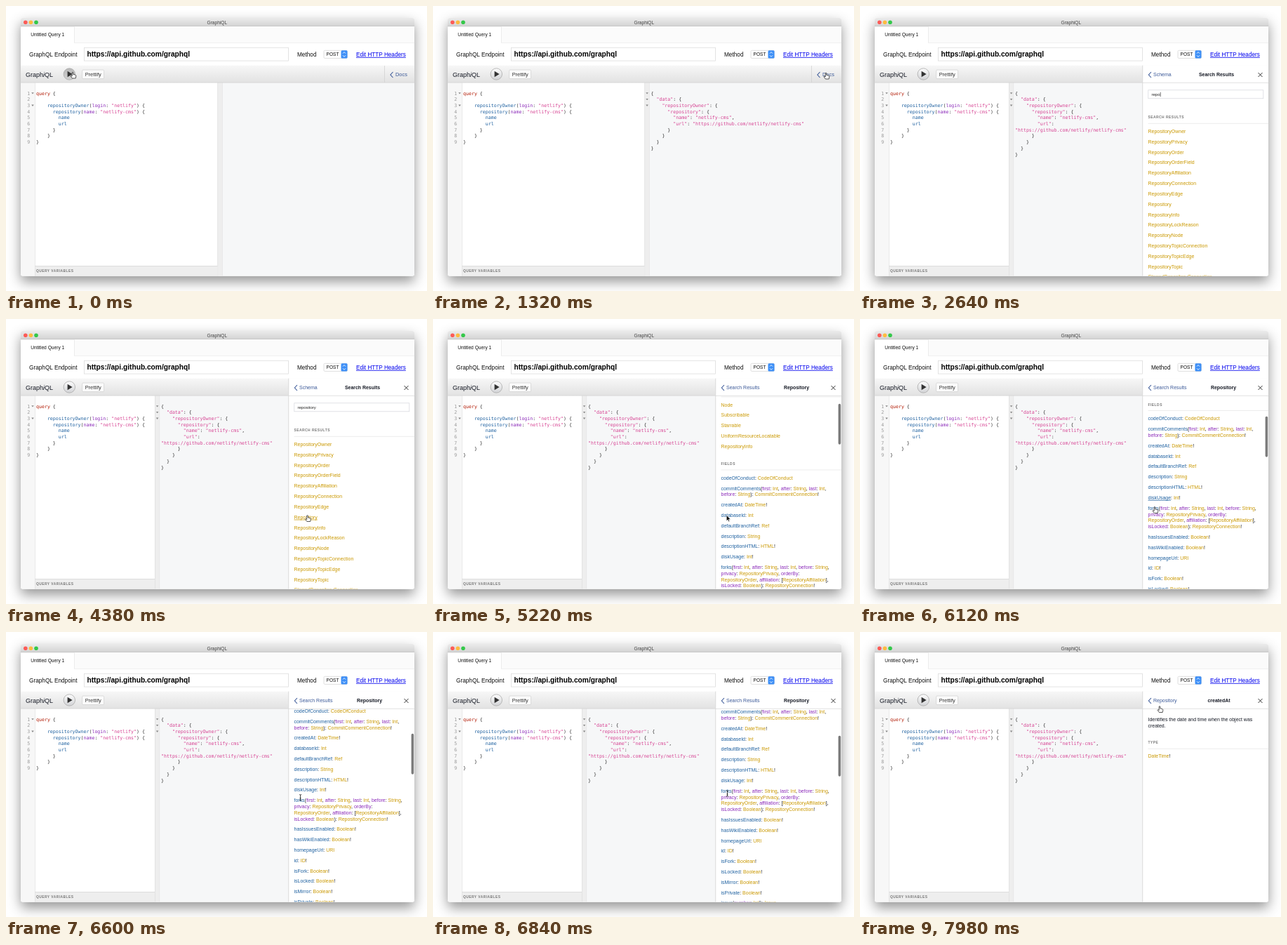
An HTML page that plays this animation: 600 px wide and 406 px high, repeating every 8000 ms.

```html
<!DOCTYPE html>
<html lang="en">
<head>
<meta charset="utf-8">
<title>GraphiQL schema browsing</title>
<style>
  html, body { margin: 0; width: 100%; height: 100%; overflow: hidden; background: #fff; }
  svg { display: block; width: 100vw; height: 100vh; }
  text { font-family: "Liberation Sans", Arial, sans-serif; white-space: pre; }
  .code { font-family: "DejaVu Sans Mono", "Liberation Mono", monospace; }
  .bold { font-weight: bold; }
  .caps { font-weight: bold; letter-spacing: .5px; }
  .shadow { filter: drop-shadow(0 8px 9px rgba(0, 0, 0, .42)); }
</style>
</head>
<body>
<svg id="stage" viewBox="0 0 600 406"></svg>
<script>
const LOOP = 8000;
const INK = '#141823', NAVY = '#3b5998', BLUE = '#1f61a0', GOLD = '#ca9800',
  PURPLE = '#8b2bb9', PINK = '#d64292', RED = '#b11a04';
const ROW = 14.81, WRAP = 8.8, CODE_ROW = 8.7, DOC_X = 410.5;

// Markup helpers; text is placed by the vertical centre of its capitals.
const rect = (x, y, w, h, fill, extra = '') =>
  `<rect x="${x}" y="${y}" width="${w}" height="${h}" fill="${fill}" ${extra}/>`;
const path = (d, stroke, width = 1, fill = 'none') =>
  `<path d="${d}" fill="${fill}" stroke="${stroke}" stroke-width="${width}"/>`;
const text = (x, y, str, size = 6.97, fill = INK, extra = '') =>
  `<text x="${x}" y="${y + size * .35}" font-size="${size}" fill="${fill}" ${extra}>${str}</text>`;
const group = (id, body, extra = '') => `<g id="${id}" ${extra}>${body}</g>`;
const span = (fill, word) => `<tspan class="link-${word.replace(/\W/g, '')}" fill="${fill}">${word}</tspan>`;
const middle = 'text-anchor="middle"';

const paintCode = line => line.replace(/"[^"]*"|\w+/g, (word, i) => span(
  word[0] === '"' ? PINK : word === 'query' ? RED : line[i + word.length] === ':' ? PURPLE : BLUE, word));
const paintDoc = (line, isField) => line.replace(/\w+/g, (word, i) => span(
  isField && i === 0 ? BLUE : line[i + word.length] === ':' ? PURPLE : GOLD, word));

const codeBlock = (x, lines) => lines.map((line, i) =>
  text(x, 124.2 + i * CODE_ROW, paintCode(line), 6.6, '#333', 'class="code"')).join('');

const fold = (x, line) => {
  const y = 123.2 + line * CODE_ROW;
  return path(`M${x - 1.8} ${y}h3.6l-1.8 2.4z`, 'none', 0, '#888');
};

function docRows(y, rows, isField) {
  let out = '';
  for (const row of rows) {
    row.split('\n').forEach((line, i) => {
      out += text(DOC_X, y + i * WRAP, paintDoc(line, isField && i === 0));
    });
    y += ROW + (row.split('\n').length - 1) * WRAP;
  }
  return out;
}

const section = (y, name) => text(DOC_X, y, name, 4.9, '#777', 'class="caps"') +
  rect(DOC_X, y + 8.4, 172, .6, '#e0e0e0');

const chevron = x => path(`M${x + 4} 94l-3.6 4 3.6 4`, NAVY, 1.1);

const header = (title, x, back) =>
  (back ? chevron(411) + text(418, 98, back, 7, NAVY) : '') +
  text(x, 98, title, 6.95, INK, `class="bold" ${middle}`) +
  path('M567.5 95l6 6m0-6l-6 6', '#333', 1);

const searchBox = rect(410.8, 119.8, 164, 12, '#fff', 'stroke="#d3d6db" stroke-width=".7"');

const queryLines = ['query {', '', '    repositoryOwner(login: "netlify") {',
  '      repository(name: "netlify-cms") {', '        name', '        url', '      }', '    }', '}'];

function resultLines(wrapped) {
  const url = '"https://github.com/netlify/netlify-cms"';
  return ['{', '  "data": {', '    "repositoryOwner": {', '      "repository": {',
    '        "name": "netlify-cms",',
    ...(wrapped ? ['        "url":', url] : ['        "url": ' + url]),
    '      }', '    }', '  }', '}'];
}

// Editor and result panes; `split` is where the result's gutter begins.
const panes = (id, split, wrapped) => group(id,
  rect(split, 109, 600, 276, '#f6f7f8') +
  rect(split, 109, 7, 276, '#eee') + rect(split, 109, .6, 276, '#ddd') + rect(split + 6.6, 109, .5, 276, '#e0e0e0') +
  group(id + '-result', codeBlock(split + 9, resultLines(wrapped)) +
    [0, 1, 2].map(i => fold(split + 3.6, i)).join('')) +
  rect(21, 370, split - 21, 15, '#eee') + rect(21, 370, split - 21, .7, '#d6d6d6') +
  text(43, 377.5, 'QUERY VARIABLES', 4.85, '#777', 'class="caps"'));

const chrome =
  rect(21, 17, 561, 12, 'url(#bar)') + rect(21, 28.6, 561, .6, '#b5b5b5') +
  ['#fc5b57', '#fdbc40', '#34c84a'].map((c, i) =>
    `<circle cx="${27.8 + i * 7.6}" cy="23.3" r="2.8" fill="${c}"/>`).join('') +
  text(300.8, 23.4, 'GraphiQL', 6.6, '#444', middle) +
  rect(97, 29.2, 485, 23, '#fbfbfb') + rect(97, 29.2, .6, 23, '#e3e3e3') + rect(97, 52, 485, .6, '#e8e8e8') +
  text(35.3, 41, 'Untitled Query 1', 6.65, '#111') +
  text(33, 69, 'GraphQL Endpoint', 8.25, '#111') +
  rect(111.4, 59.3, 291, 18.8, '#fff', 'stroke="#ddd" stroke-width=".8"') +
  text(115.5, 68.7, 'https://api.github.com/graphql', 10.2, '#000', 'class="bold"') +
  text(415, 69, 'Method', 8.25, '#111') +
  rect(453, 63.3, 33.5, 11.2, '#fff', 'rx="1.5" stroke="#ccc" stroke-width=".6"') +
  rect(477.5, 63.3, 9, 11.2, '#3d8ff7', 'rx="1.5"') +
  path('M480 67.6l2-2 2 2m-4 2.7l2 2 2-2', '#fff', .9) +
  text(456.5, 69, 'POST', 6.6, '#111') +
  text(499, 69, 'Edit HTTP Headers', 8.2, '#00e', 'text-decoration="underline"') +
  rect(21, 84.7, 561, 24.5, 'url(#tools)') + rect(21, 108.7, 561, .7, '#d0d0d0') +
  text(28, 97.5, 'Graph<tspan font-style="italic">i</tspan>QL', 9, INK) +
  '<circle id="play" cx="90.3" cy="97" r="8.2" stroke="#a9a9a9" stroke-width=".8"/>' +
  path('M87.6 92.8v8.4l7-4.2z', 'none', 0, '#333') +
  rect(108.6, 91, 31, 12.6, '#fbfbfb', 'rx="1.5" stroke="#cfcfcf" stroke-width=".7"') +
  text(124.2, 97.2, 'Prettify', 7.4, '#333', middle) +
  rect(539, 85, .7, 24, '#cfcfcf') + chevron(547.5) + text(555, 97.7, 'Docs', 7.4, NAVY);

const gutter = rect(21, 109.3, 20, 276, '#f7f7f7') + rect(41, 109.3, .6, 276, '#ddd') +
  queryLines.map((_, i) => text(34.3, 124.2 + i * CODE_ROW, i + 1, 6.6, '#999', 'class="code" text-anchor="end"')).join('') +
  fold(38, 0) + fold(38, 2) + codeBlock(43, queryLines);

const rootPage = header('Documentation Explorer', 492) + searchBox +
  text(415.5, 126, 'Search Schema...', 6, '#aaa') +
  text(DOC_X, 145, 'A GraphQL schema provides a root type for each') +
  text(DOC_X, 145 + WRAP, 'kind of operation.') +
  section(178, 'ROOT TYPES') + docRows(198, ['query: Query', 'mutation: Mutation'], true);

const suffixes = ['Owner', 'Privacy', 'Order', 'OrderField', 'Affiliation', 'Connection', 'Edge', '',
  'Info', 'LockReason', 'Node', 'TopicConnection', 'TopicEdge', 'Topic'];
const searchPage = header('Search Results', 508, 'Schema') + searchBox +
  text(415.5, 126, '', 6, '#222', 'id="typed"') + rect(0, 122.8, .6, 6.4, '#111', 'id="caret"') +
  section(158.5, 'SEARCH RESULTS') +
  docRows(178.6, [...suffixes.map(s => 'Repository' + s), 'StarredRepositoryConnection']);

const fields = ['codeOfConduct: CodeOfConduct',
  'commitComments(first: Int, after: String, last: Int,\nbefore: String): CommitCommentConnection!',
  'createdAt: DateTime!', 'databaseId: Int', 'defaultBranchRef: Ref', 'description: String',
  'descriptionHTML: HTML!', 'diskUsage: Int!',
  'forks(first: Int, after: String, last: Int, before: String,\nprivacy: RepositoryPrivacy, orderBy:\n' +
  'RepositoryOrder, affiliation: [RepositoryAffiliation],\nisLocked: Boolean): RepositoryConnection!',
  'hasIssuesEnabled: Boolean!', 'hasWikiEnabled: Boolean!', 'homepageUrl: URI', 'id: ID!', 'isFork: Boolean!',
  'isLocked: Boolean!', 'isMirror: Boolean!', 'isPrivate: Boolean!', 'issue(number: Int!): Issue'];
const typePage = header('Repository', 518, 'Search Results') +
  '<g clip-path="url(#docClip)">' + group('scroller',
    text(DOC_X, 124.5, 'A repository contains the content for a project.') +
    section(149, 'IMPLEMENTS') +
    docRows(168.8, ['Node', 'Subscribable', 'Starrable', 'UniformResourceLocatable', 'RepositoryInfo']) +
    section(253, 'FIELDS') + docRows(273, fields, true)) + '</g>' +
  rect(577.6, 111, 3.6, 58, '#7c7c7c', 'id="thumb" rx="1.8"');

const fieldPage = header('createdAt', 511.5, 'Repository') +
  text(DOC_X, 124.5, 'Identifies the date and time when the object was') +
  text(DOC_X, 124.5 + WRAP, 'created.') + section(157.5, 'TYPE') + docRows(176.8, ['DateTime!']);

const pages = { root: rootPage, search: searchPage, type: typePage, field: fieldPage };
const docs = group('docs',
  rect(402.4, 84.7, 180, 301, '#fff') + rect(402.4, 84.7, .8, 301, '#cfcfcf') + rect(402.4, 108.9, 180, .7, '#d6d6d6') +
  Object.entries(pages).map(([name, body]) => group('page-' + name, body)).join(''));

const cursors = group('cursor',
  group('cursor-arrow', path('M0 0V8.2L1.9 6.5 3.1 9.2 4.4 8.6 3.2 6H5.8Z', '#fff', .6, '#000')) +
  group('cursor-hand', path('M-.8 .6Q0-.5 .8 .6V3.4L3.6 4Q5 4.4 4.8 6L4.2 9H-.6L-3 5.8Q-2.8 4.4-.8 6Z', '#111', .7, '#fff')) +
  group('cursor-beam', path('M-1.5-4.2Q0-4.2 0-3.2 0-4.2 1.5-4.2M0-3.2V3.2M-1.5 4.2Q0 4.2 0 3.2 0 4.2 1.5 4.2M-1 1H1', '#111', .8)));

const gradient = (id, from, to) => `<linearGradient id="${id}" x2="0" y2="1">
  <stop stop-color="${from}"/><stop offset="1" stop-color="${to}"/></linearGradient>`;
const frame = 'rx="3"';
const stage = document.getElementById('stage');
stage.innerHTML = `<defs>
  ${gradient('bar', '#ebebeb', '#d3d3d3')}${gradient('tools', '#f7f7f7', '#e2e2e2')}
  ${gradient('idle', '#fdfdfd', '#d2d3d6')}${gradient('pressed', '#b8b8b8', '#d2d2d2')}
  <clipPath id="window">${rect(21, 17, 561, 367.5, '#000', frame)}</clipPath>
  <clipPath id="docClip">${rect(403, 110, 179, 275, '#000')}</clipPath></defs>` +
  rect(21, 17, 561, 367.5, '#fff', frame + ' class="shadow"') +
  `<g clip-path="url(#window)">${rect(21, 17, 561, 368, '#fff')}${panes('wide', 301.5, false)}${panes('narrow', 212, true)}
  ${gutter}${chrome}${docs}</g>` + cursors;

// Timeline: eased tracks hold [time, ...values]; stepped tracks hold [time, value].
const pointer = [[0, 95, 94], [360, 95, 94], [780, 330, 268], [1200, 560, 95], [1440, 560, 95],
  [1800, 455, 126], [3420, 455, 126], [4140, 429.5, 279.5], [4900, 429.5, 279.5], [5300, 417, 279.5],
  [5700, 417, 279.5], [6000, 420, 267.5], [6300, 420, 267.5], [6700, 419.5, 230], [6950, 419.5, 230],
  [7250, 425, 135], [7500, 425, 135], [7900, 427, 105.5]];
const scrolling = [[4950, 0], [5500, 95.5], [5680, 95.5], [6060, 131], [6300, 131], [6780, 174]];
const shapes = [[0, 'hand'], [420, 'arrow'], [1140, 'hand'], [1500, 'arrow'], [1740, 'beam'], [2160, 'none'],
  [3420, 'beam'], [3540, 'arrow'], [4020, 'hand'], [5000, 'arrow'], [5940, 'hand'], [6600, 'beam'],
  [7100, 'hand'], [7500, 'arrow'], [7800, 'hand']];
const pageTimes = [[0, 'none'], [1380, 'root'], [2160, 'search'], [4500, 'type'], [7380, 'field']];
const hovers = [[0, ''], [4080, 'Repository'], [4500, ''], [5850, 'diskUsage'], [6240, ''], [7200, 'createdAt'], [7380, '']];
const keyTimes = [2160, 2280, 2400, 2520, 2700, 2820, 2940, 3060, 3180, 3300];

const stepAt = (keys, t) => keys.findLast(k => k[0] <= t)[1];

function easeAt(keys, t) {
  const next = keys.findIndex(k => k[0] > t);
  if (next < 1) return keys.at(next).slice(1);
  const a = keys[next - 1], b = keys[next];
  const p = (t - a[0]) / (b[0] - a[0]), eased = p * p * (3 - 2 * p);
  return a.slice(1).map((v, i) => v + (b[i + 1] - v) * eased);
}

const $ = id => document.getElementById(id);
const show = (id, on) => $(id).setAttribute('display', on ? 'inline' : 'none');

function render(t) {
  const page = stepAt(pageTimes, t), shape = stepAt(shapes, t), hover = stepAt(hovers, t);
  const docsOpen = page !== 'none';
  show('docs', docsOpen);
  show('narrow', docsOpen);
  show('wide', !docsOpen);
  show('wide-result', t >= 600);
  for (const name in pages) show('page-' + name, page === name);
  $('play').setAttribute('fill', `url(#${t < 240 ? 'pressed' : 'idle'})`);

  $('typed').textContent = 'repository'.slice(0, keyTimes.filter(k => k <= t).length);
  if (page === 'search') $('caret').setAttribute('x', 415.8 + $('typed').getComputedTextLength());
  show('caret', t < 3360 || Math.floor((t - 3360) / 500) % 2 === 1);

  const [scroll] = easeAt(scrolling, Math.max(t, scrolling[0][0]));
  $('scroller').setAttribute('transform', `translate(0 ${-scroll})`);
  $('thumb').setAttribute('y', 111 + scroll * .211);
  show('thumb', t >= scrolling[0][0]);

  for (const name of ['Repository', 'diskUsage', 'createdAt'])
    for (const link of stage.querySelectorAll('.link-' + name))
      link.setAttribute('text-decoration', hover === name ? 'underline' : 'none');

  $('cursor').setAttribute('transform', `translate(${easeAt(pointer, t).join(' ')})`);
  for (const name of ['arrow', 'hand', 'beam']) show('cursor-' + name, shape === name);
}

const start = performance.now();
function tick() {
  render((performance.now() - start) % LOOP);
  requestAnimationFrame(tick);
}
tick();
</script>
</body>
</html>
```
